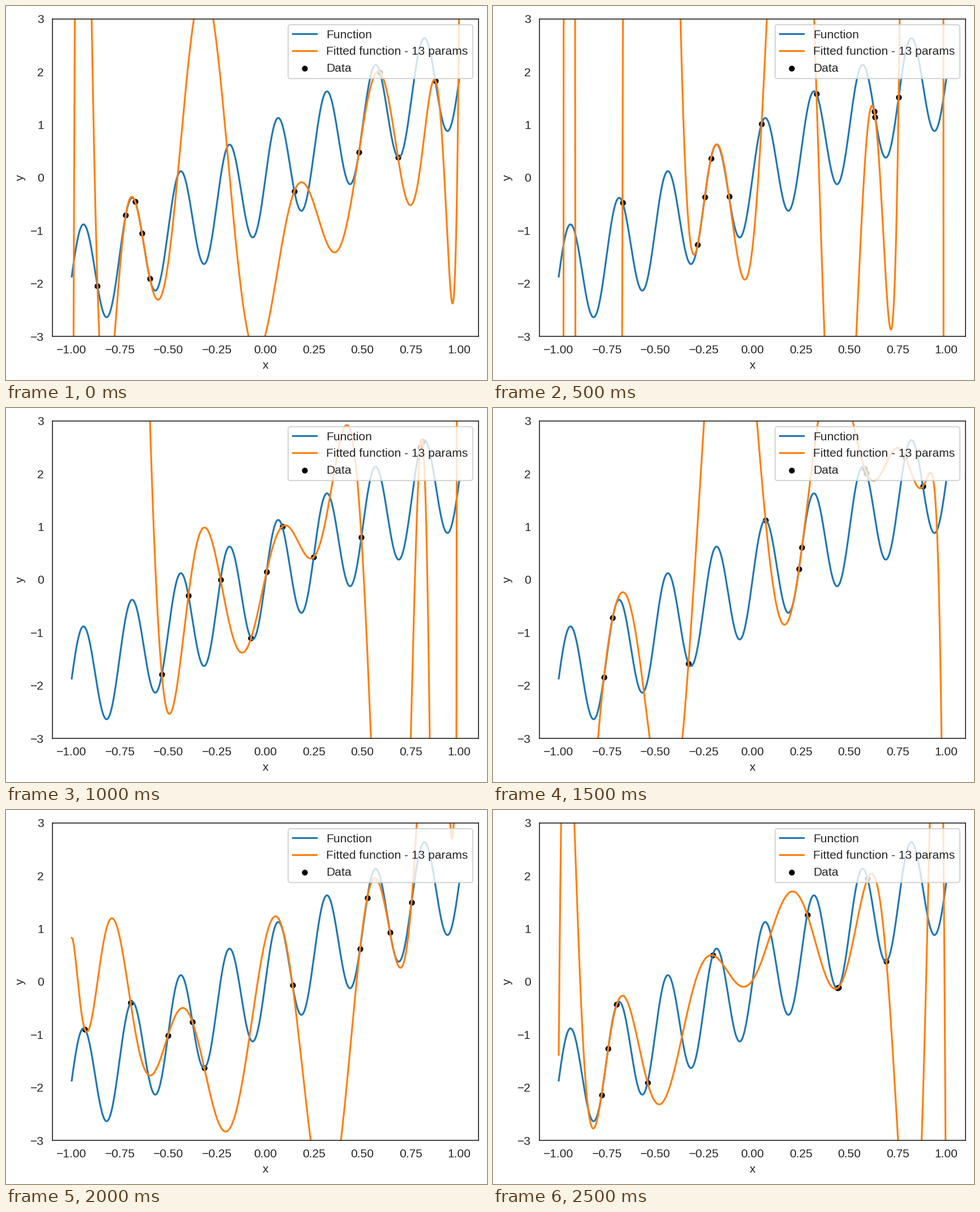
Animation of 849 by 660 pixels, one loop 3 s. Source, as a matplotlib script:

```python
import numpy as np
import matplotlib.pyplot as plt
from matplotlib.animation import FuncAnimation
from numpy.polynomial import legendre

WIDTH, HEIGHT, DPI = 849, 660, 100
LEFT, TOP, AX_W, AX_H = 81.8, 22.8, 752.4, 560.4
S = 1.5165  # point scale of the plot
INK = "0.15"
PARAMS = 13

# Where each panel samples the function.
SAMPLES = np.array([
    [-0.867, -0.7208, -0.6725, -0.6374, -0.5965, 0.149, 0.4825, 0.5906, 0.684, 0.8763],
    [-0.671, -0.2823, -0.246, -0.2149, -0.1213, 0.0468, 0.3304, 0.6287, 0.633, 0.7544],
    [-0.535, -0.3977, -0.232, -0.0746, 0.0055, 0.0863, 0.2485, 0.4952, 0.799, 0.811],
    [-0.7664, -0.7216, -0.3304, 0.0673, 0.24, 0.2552, 0.579, 0.5885, 0.788, 0.8795],
    [-0.9327, -0.696, -0.503, -0.3766, -0.3158, 0.1397, 0.488, 0.525, 0.6428, 0.7535],
    [-0.779, -0.745, -0.7003, -0.5415, -0.2055, 0.2825, 0.439, 0.4445, 0.594, 0.6915],
])

plt.rcParams.update({
    "font.family": "Liberation Sans",
    "font.size": 10 * S,
    "text.color": INK,
    "axes.labelcolor": INK,
    "axes.edgecolor": INK,
    "axes.linewidth": 0.8 * S,
    "xtick.color": INK,
    "ytick.color": INK,
    "lines.linewidth": 1.5 * S,
    "patch.linewidth": 1.0 * S,
})


def truth(x):
    return 2 * x + np.sin(25 * x)


def features(x):
    """Legendre polynomials of degree 1 to PARAMS."""
    return legendre.legvander(x, PARAMS)[:, 1:]


def fit(x):
    """Least-norm coefficients through the samples."""
    return np.linalg.lstsq(features(x), truth(x), rcond=None)[0]


grid = np.linspace(-1, 1, 2000)
curves = [features(grid) @ fit(x) for x in SAMPLES]

fig = plt.figure(figsize=(WIDTH / DPI, HEIGHT / DPI), dpi=DPI, facecolor="white")
ax = fig.add_axes([LEFT / WIDTH, 1 - (TOP + AX_H) / HEIGHT, AX_W / WIDTH, AX_H / HEIGHT])
ax.set(xlim=(-1.1, 1.1), ylim=(-3, 3),
       xticks=np.linspace(-1, 1, 9), yticks=range(-3, 4))
ax.tick_params(length=3.5 * S, pad=3.5 * S, bottom=False, left=False)
ax.set_xlabel("x", labelpad=4 * S)
ax.set_ylabel("y", labelpad=4 * S)

ax.plot(grid, truth(grid), color="#1f77b4", label="Function")
fitted, = ax.plot([], [], color="#ff7f0e", label=f"Fitted function - {PARAMS} params")
dots = ax.scatter([0], [0], s=15 * S**2, color="black", label="Data")
ax.legend(loc="upper right")


def draw(i):
    fitted.set_data(grid, curves[i])
    dots.set_offsets(np.c_[SAMPLES[i], truth(SAMPLES[i])])
    return fitted, dots


anim = FuncAnimation(fig, draw, frames=len(SAMPLES), interval=500,
                     repeat=True, repeat_delay=0)
plt.show()
```
